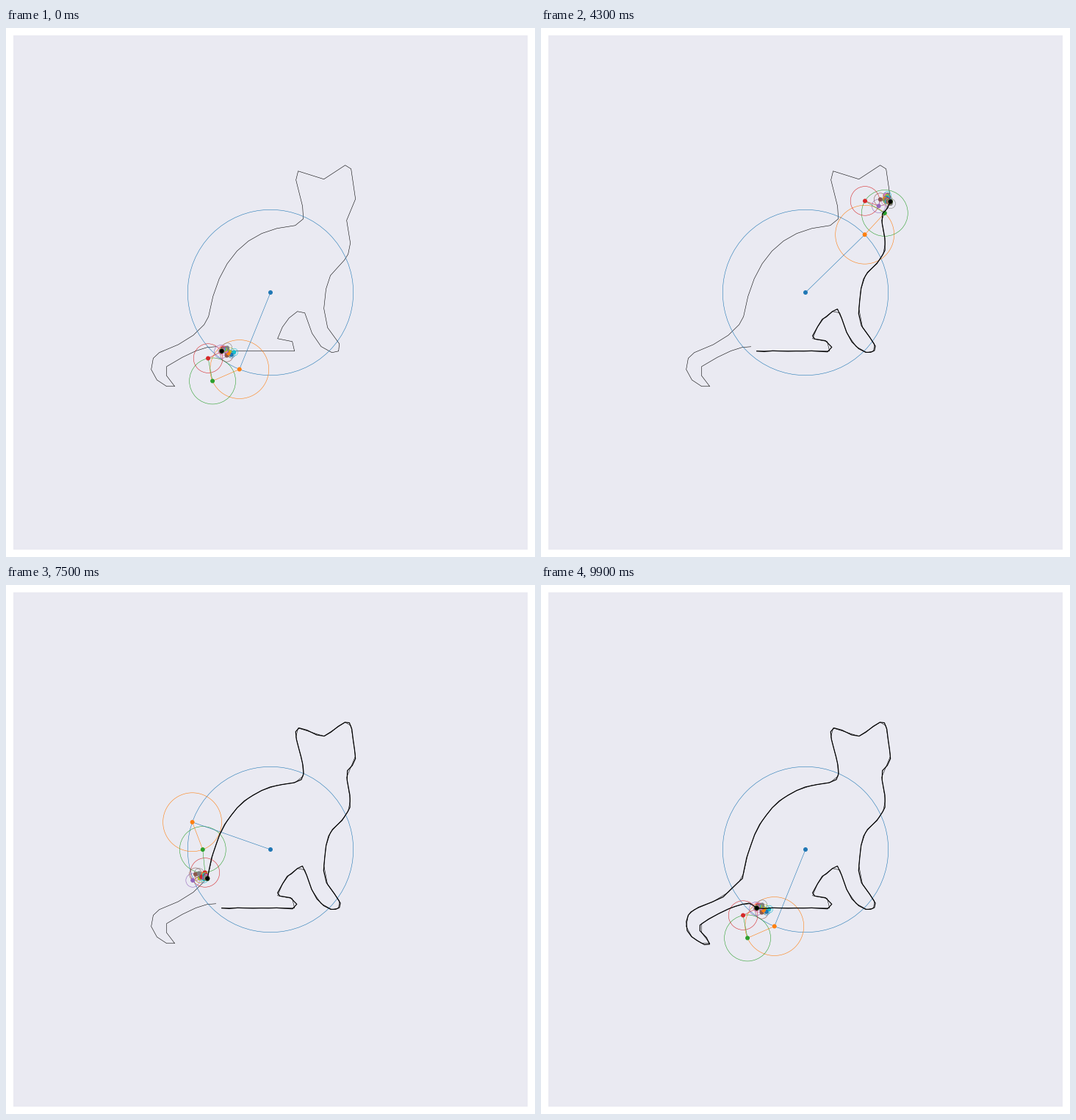
These frames come from a looping animation (720x720 px, 10 s). A matplotlib script:

```python
import numpy as np
import matplotlib.pyplot as plt
from matplotlib.animation import FuncAnimation
from matplotlib.collections import EllipseCollection, LineCollection

SIZE, DPI, PAD = 720, 100, 10
FRAMES, INTERVAL = 100, 100
CENTER = SIZE / 2 * (1 + 1j)
THIN, BOLD = 0.4, 0.85


class Pen:
    """Samples straight lines and quadratic curves, points as x + yj."""

    def __init__(self, start):
        self.points = [start]

    def line(self, end, steps=1):
        return self.curve((self.points[-1] + end) / 2, end, steps)

    def curve(self, control, end, steps=2):
        start = self.points[-1]
        t = np.arange(1, steps + 1) / steps
        self.points.extend((1 - t)**2 * start + 2 * t * (1 - t) * control
                           + t**2 * end)
        return self


def draw_cat():
    cat = Pen(294 + 439j)
    # belly and hind paw
    cat.line(393 + 439j, 6).line(390 + 426j).line(370 + 422j)
    # front leg
    cat.curve(378 + 396j, 397 + 385j, 3).line(407 + 387j)
    cat.curve(420 + 436j, 444 + 441j, 3).curve(457 + 443j, 454 + 429j)
    # chest and throat
    cat.curve(432.5 + 409j, 433 + 381j).curve(435 + 335j, 451 + 326j, 3)
    cat.curve(463.5 + 313.5j, 466 + 307j).curve(473 + 300j, 464 + 261j)
    # face, ears and neck
    cat.line(476 + 232j, 2).line(470 + 191j, 2).line(462 + 186j)
    cat.line(433 + 205j, 2).line(398 + 194j, 2).line(395 + 206j)
    cat.line(404 + 242j, 2).curve(411 + 263j, 394 + 268j)
    # back
    cat.line(369 + 272j).curve(293 + 290j, 276 + 392j, 7).line(270 + 403j)
    # tail
    cat.curve(252 + 426j, 209 + 441j, 3).curve(198 + 445j, 198 + 464j)
    cat.curve(203 + 481j, 219 + 487j).line(230 + 487j)
    cat.curve(213 + 471j, 219 + 460j).curve(265 + 431j, 286 + 433j, 4)
    z = np.array(cat.points)
    return z - z.mean()


def epicycles(z):
    """Fourier terms without the constant, largest first."""
    n = len(z)
    coef = np.fft.fft(z) / n
    freq = np.round(np.fft.fftfreq(n) * n)
    order = [k for k in np.argsort(-np.abs(coef)) if freq[k] != 0]
    return coef[order], freq[order]


def xy(z):
    return np.column_stack([z.real, z.imag])


cat = draw_cat()
coef, freq = epicycles(cat)
radii = np.abs(coef)
colors = [f"C{k % 10}" for k in range(len(coef))]

# joints[i] holds every arm joint at step i; the last one is the tip.
turn = np.linspace(0, 2 * np.pi, FRAMES)
arms = coef * np.exp(1j * np.outer(turn, freq))
joints = CENTER + np.hstack([np.zeros((FRAMES, 1)), np.cumsum(arms, axis=1)])
tip = joints[:, -1]

fig = plt.figure(figsize=(SIZE / DPI, SIZE / DPI), dpi=DPI, facecolor="white")
inner = 1 - 2 * PAD / SIZE
ax = fig.add_axes([PAD / SIZE, PAD / SIZE, inner, inner], facecolor="#eaeaf2")
for spine in ax.spines.values():
    spine.set_visible(False)

outline = cat + CENTER
ax.plot(outline.real, outline.imag, color="black", lw=THIN)

start = xy(joints[0])
circles = EllipseCollection(
    2 * radii, 2 * radii, np.zeros(len(radii)), units="xy",
    offsets=start[:-1], offset_transform=ax.transData, facecolors="none",
    edgecolors=colors, linewidths=THIN, zorder=2.1)
rods = LineCollection([], colors=colors, linewidths=THIN, zorder=2.2)
ax.add_collection(circles, autolim=False)
ax.add_collection(rods, autolim=False)
dots = ax.scatter(start[:, 0], start[:, 1], s=12, linewidths=0.8,
                  c=colors + ["black"], zorder=2.3)
trace, = ax.plot([], [], color="black", lw=BOLD, zorder=2.4)
ax.set(xlim=(PAD, SIZE - PAD), ylim=(SIZE - PAD, PAD), xticks=[], yticks=[])


def update(i):
    chain = xy(joints[i])
    circles.set_offsets(chain[:-1])
    dots.set_offsets(chain)
    rods.set_segments(np.stack([chain[:-1], chain[1:]], axis=1))
    trace.set_data(tip[:i + 1].real, tip[:i + 1].imag)
    return circles, rods, dots, trace


anim = FuncAnimation(fig, update, frames=FRAMES, interval=INTERVAL,
                     repeat=True, repeat_delay=0)
plt.show()
```
